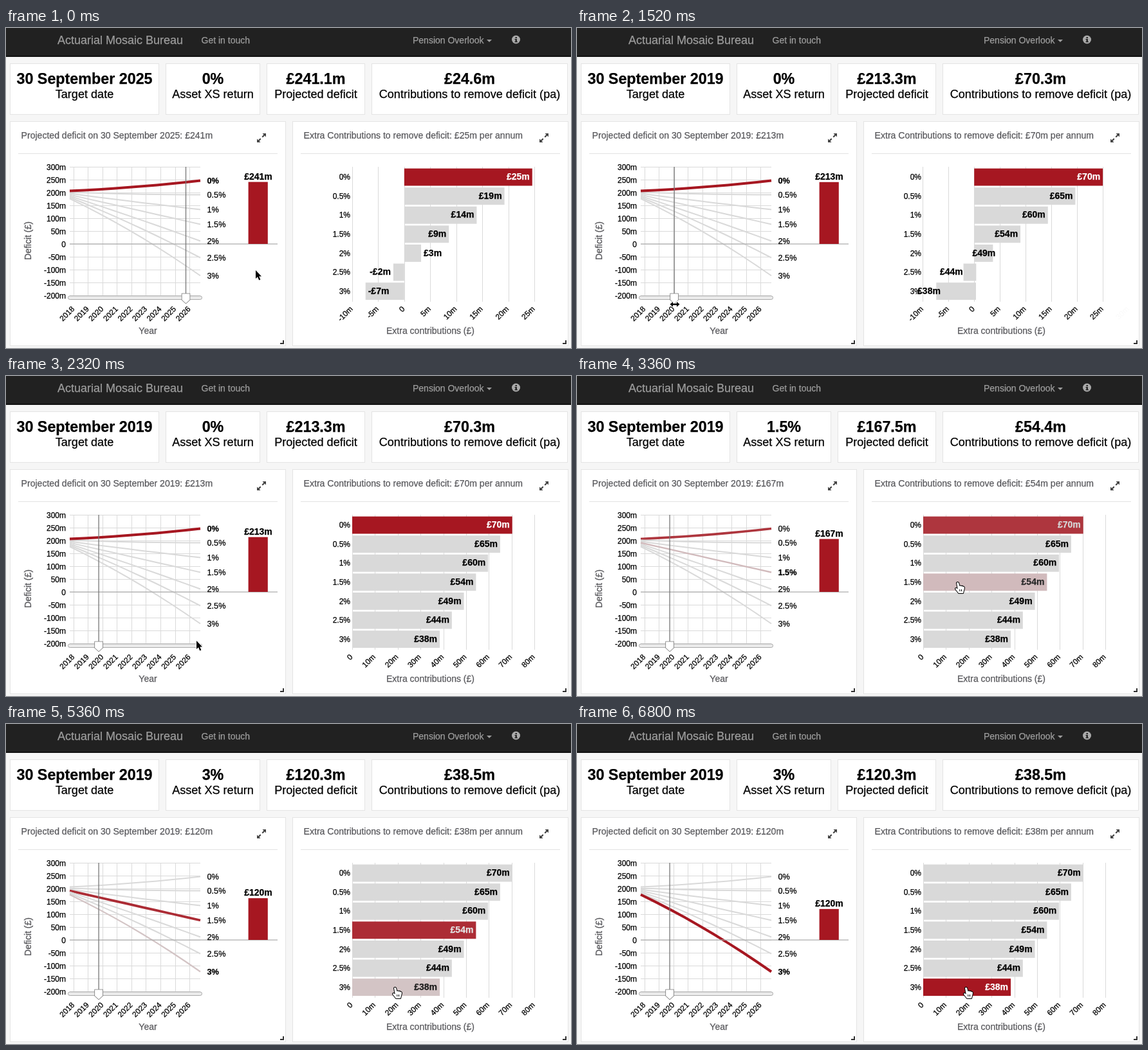
An HTML page with a canvas that plays this animation: 878x498 px, repeating every 6840 ms.

```html
<!DOCTYPE html>
<html lang="en">
<head>
<meta charset="utf-8">
<title>Deficit dashboard</title>
<style>
html, body { margin: 0; width: 100%; height: 100%; overflow: hidden; background: #f6f6f6; }
canvas { display: block; }
</style>
</head>
<body>
<canvas id="stage" width="878" height="498"></canvas>
<script>
const c = document.getElementById('stage').getContext('2d');
const LOOP = 6840, DURATION = 600;
const RED = [166, 23, 33], GREY = [217, 217, 217], WHITE = [255, 255, 255], BLACK = [0, 0, 0];

// Each stage starts at a click or a release of the slider.
const stages = [
  { start: -DURATION, year: 2025, pick: 0, deficit: 241.1, top: 24.6, step: 5.34, min: -10, max: 25, tick: 5 },
  { start: 1418, year: 2019, pick: 0, deficit: 213.3, top: 70.3, step: 5.306, min: 0, max: 80, tick: 10 },
  { start: 3156, year: 2019, pick: 3, deficit: 167.47, top: 70.3, step: 5.306, min: 0, max: 80, tick: 10 },
  { start: 5180, year: 2019, pick: 6, deficit: 120.3, top: 70.3, step: 5.306, min: 0, max: 80, tick: 10 }
];
const lineEnds = [237, 259, 282, 305, 331, 357, 385];
const lineBends = [-7, -4, -2, 0, 4, 12, 22];
const cursorPath = [
  [0, 388, 377], [620, 280, 424], [750, 280, 425], [1400, 152, 430], [1600, 152, 430],
  [2320, 296, 412], [3080, 592, 321], [3420, 592, 321], [3960, 597, 356],
  [4300, 598, 360], [5080, 605, 410], [LOOP, 605, 410]
];

const mix = (a, b, p) => a + (b - a) * p;
const blend = (a, b, p) => `rgb(${a.map((v, i) => Math.round(mix(v, b[i], p)))})`;
const clamp = p => Math.max(0, Math.min(1, p));
const cubic = p => p < .5 ? 4 * p ** 3 : 1 - 4 * (1 - p) ** 3;
const smooth = p => p * p * (3 - 2 * p);
const percent = i => i / 2 + '%';
const money = v => (v < 0 ? '-' : '') + '£' + Math.abs(Math.round(v)) + 'm';
const yearX = y => 99 + (y - 2017.75) * 203 / 9;
const rowY = i => 218.6 + 29.6 * i;
const valueAt = (s, i) => s.top - s.step * i;
const scaleX = (s, v) => 538 + (v - s.min) * 283 / (s.max - s.min);

// A hairline stroke gives the type its slightly heavier weight.
function text(str, x, y, size, color = '#000', align = 'left', bold = false) {
  c.font = `${bold ? 'bold ' : ''}${size}px "Liberation Sans", Arial, sans-serif`;
  c.fillStyle = c.strokeStyle = color;
  c.textAlign = align;
  c.lineWidth = .25;
  c.fillText(str, x, y);
  c.strokeText(str, x, y);
}

function turned(str, x, y, angle, size, color, align) {
  c.save();
  c.translate(x, y);
  c.rotate(angle);
  text(str, 0, 0, size, color, align);
  c.restore();
}

function rect(x, y, w, h, color) {
  c.fillStyle = color;
  c.fillRect(x, y, w, h);
}

function line(points, color, width = 1) {
  c.beginPath();
  points.forEach(([x, y]) => c.lineTo(x, y));
  c.strokeStyle = color;
  c.lineWidth = width;
  c.stroke();
}

function shape(d, x, y, fill, stroke, width = 1) {
  c.save();
  c.translate(x, y);
  const p = new Path2D(d);
  c.lineWidth = width;
  c.lineJoin = 'round';
  c.strokeStyle = stroke;
  c.fillStyle = fill;
  c.stroke(p);
  c.fill(p);
  c.restore();
}

function box(x, y, w, h) {
  rect(x, y, w, h, '#e4e4e4');
  rect(x + 1, y + 1, w - 2, h - 2, '#fff');
}

function header() {
  rect(0, 0, 878, 44, '#212121');
  rect(0, 43, 878, 2, '#101010');
  text('Actuarial Mosaic Bureau', 80, 25, 18, '#9d9d9d');
  text('Get in touch', 303.5, 24, 14, '#9d9d9d');
  text('Pension Overlook', 632, 24, 14, '#9d9d9d');
  shape('M0 0H8L4 4Z', 747, 18, '#9d9d9d', 'transparent');
  c.beginPath();
  c.arc(792.5, 18, 6.5, 0, 7);
  c.fillStyle = '#aaa';
  c.fill();
  rect(791.5, 14, 2.4, 2, '#212121');
  rect(791.5, 17, 2.4, 5, '#212121');
  rect(790.5, 17, 2, 1.2, '#212121');
  rect(790.5, 21, 4.4, 1.2, '#212121');
}

function card(x, w, big, small) {
  box(x, 55, w, 80);
  text(big, x + w / 2, 87, 23.3, '#000', 'center', true);
  text(small, x + w / 2, 109, 18.1, '#000', 'center');
}

function panel(x, title) {
  box(x, 145, 429, 350);
  text(title, x + 17.6, 172, 14.05, '#58585c');
  rect(x + 13, 195, 403, 1, '#e2e2e2');
  const arrow = 'M7 -7V-1.5L5 -3.5 2 -.5 .5 -2 3.5 -5 1.5 -7Z';
  for (const turn of [0, Math.PI]) {
    c.save();
    c.translate(x + 391, 171);
    c.rotate(turn);
    shape(arrow, 0, 0, '#444', 'transparent');
    c.restore();
  }
  line([[x + 420, 491], [x + 425, 491], [x + 425, 486]], '#333', 2);
}

function lineChart(now, old, e, handle) {
  for (let v = -200; v <= 300; v += 50) {
    const y = 336 - v * .4;
    rect(99, y, 203, 1, '#dadada');
    text(v ? v + 'm' : '0', 93, y + 5, 12, '#000', 'right');
  }
  for (let y = 2018; y <= 2026; y++) {
    const x = yearX(y);
    rect(Math.round(x), 216, 1, 200, '#dadada');
    turned(y, x + 2.5, 438, -Math.PI / 4, 12, '#000', 'right');
  }
  const order = [0, 1, 2, 3, 4, 5, 6].sort((a, b) => (a === now.pick) - (b === now.pick));
  for (const i of order) {
    const on = mix(old.pick === i, now.pick === i, e);
    const first = 253 + 2 * i, bend = lineBends[i], points = [];
    for (let k = 0; k <= 9; k++) {
      const u = k / 9;
      points.push([99 + 203 * u, first + .5 + (lineEnds[i] - first - bend) * u + bend * u * u]);
    }
    line(points, blend(GREY, RED, on), 2 + 2 * on);
  }
  rect(99, 335.5, 323, 1.2, '#aaa');
  lineEnds.forEach((y, i) => text(percent(i), 312.5, y + 4.5, 12.7, '#000', 'left', i === now.pick));

  const top = 336 - mix(old.deficit, now.deficit, e) * .4;
  rect(376.6, top, 30.2, 336 - top, blend(RED, RED, 0));
  text('£' + Math.floor(now.deficit) + 'm', 392, top - 4, 14, '#000', 'center', true);
  text('Year', 220.5, 476, 14, '#58585c', 'center');
  turned('Deficit (£)', 39, 331, -Math.PI / 2, 14, '#58585c', 'center');

  c.beginPath();
  c.roundRect(96.5, 417, 208, 5.5, 2.7);
  c.fillStyle = '#ececec';
  c.fill();
  c.strokeStyle = '#aaa';
  c.lineWidth = 1;
  c.stroke();
  line([[handle, 216], [handle, 413]], '#777', 1.3);
  shape('M-6 -7H6V2.5L0 8 -6 2.5Z', handle, 420.5, '#fff', '#777', 1.6);
}

function ticks(s, from, to, e, alpha) {
  c.globalAlpha = alpha;
  for (let v = s.min; v <= s.max; v += s.tick) {
    const x = mix(scaleX(from, v), scaleX(to, v), e);
    rect(Math.round(x), 216, 1, 210, '#dadada');
    turned(v ? v + 'm' : '0', x + 1.5, 438, -Math.PI / 4, 12, '#000', 'right');
  }
  c.globalAlpha = 1;
}

// Labels sit inside the bar's tip, or just outside when the bar is short.
function label(s, i) {
  const v = valueAt(s, i), x = scaleX(s, v), short = Math.abs(x - scaleX(s, 0)) < 40;
  const left = (v < 0) !== short;
  return { x: x + (left ? 4 : -4), align: left ? 'left' : 'right' };
}

function barChart(now, old, e) {
  c.save();
  c.beginPath();
  c.rect(446, 197, 427, 290);
  c.clip();
  if (now.max !== old.max && e < 1) ticks(old, old, now, e, 1 - e);
  ticks(now, old, now, e, now.max === old.max ? 1 : e);
  for (let i = 0; i < 7; i++) {
    const on = mix(old.pick === i, now.pick === i, e);
    const edges = s => [scaleX(s, 0), scaleX(s, valueAt(s, i))].sort((a, b) => a - b);
    const a = edges(old), b = edges(now);
    const left = mix(a[0], b[0], e), right = mix(a[1], b[1], e);
    rect(left, rowY(i), right - left, 26.9, blend(GREY, RED, on));
  }
  for (let i = 0; i < 7; i++) {
    const on = mix(old.pick === i, now.pick === i, e);
    const y = rowY(i) + 17.5, place = label(now, i);
    text(percent(i), 535, y, 12, '#000', 'right');
    text(money(valueAt(now, i)), mix(label(old, i).x, place.x, e), y, 14,
      blend(BLACK, WHITE, on), place.align, true);
  }
  c.restore();
  text('Extra contributions (£)', 659.5, 476, 14, '#58585c', 'center');
}

function cursorAt(t) {
  const k = Math.max(1, cursorPath.findIndex(p => p[0] > t));
  const [t0, x0, y0] = cursorPath[k - 1], [t1, x1, y1] = cursorPath[k];
  const p = smooth((t - t0) / (t1 - t0));
  return [mix(x0, x1, p), mix(y0, y1, p)];
}

function cursor(t, x, y) {
  if (t > 620 && t < 1640) {
    shape('M-7.5 0L-3 -4V-1.2H3V-4L7.5 0 3 4V1.2H-3V4Z', x, y, '#000', '#fff', 2);
  } else if (x < 538) {
    shape('M0 0V13L3 10.3 5.2 15.5 7.4 14.5 5.2 9.5H9Z', x, y, '#000', '#fff', 2);
  } else {
    shape('M-1.5 1Q0 -.8 1.6 1L3 6Q4.5 4.8 5.8 6.2 7.2 5.3 8.4 6.9 10.4 6.5 10.5 8.8L9.6 13 8.5 17H1.5L-3.2 11Q-4 8.8 -2 9L.2 10.5Z',
      x - .5, y, '#fff', '#000', 2);
    line([[x + 2.7, y + 11], [x + 3, y + 14]], '#000');
    line([[x + 5.5, y + 11], [x + 5.5, y + 14]], '#000');
  }
}

function draw(t) {
  const k = stages.findLastIndex(s => s.start <= t);
  const now = stages[k], old = stages[Math.max(0, k - 1)];
  const e = cubic(clamp((t - now.start) / DURATION));
  const [x, y] = cursorAt(t);
  const handle = t < 750 ? 279.5 : k === 0 ? Math.min(279.5, x - .5)
    : k === 1 ? mix(151.3, yearX(2019.75), e) : yearX(2019.75);
  const extra = valueAt(now, now.pick), date = '30 September ' + now.year;

  rect(0, 0, 878, 498, '#f6f6f6');
  header();
  card(6, 232, date, 'Target date');
  card(248, 147, percent(now.pick), 'Asset XS return');
  card(405, 153, `£${now.deficit.toFixed(1)}m`, 'Projected deficit');
  card(568, 305, `£${extra.toFixed(1)}m`, 'Contributions to remove deficit (pa)');
  panel(6, `Projected deficit on ${date}: £${Math.floor(now.deficit)}m`);
  panel(445, `Extra Contributions to remove deficit: ${money(extra)} per annum`);
  lineChart(now, old, e, handle);
  barChart(now, old, e);
  cursor(t, x, y);
}

const begin = performance.now();
function frame() {
  draw((performance.now() - begin) % LOOP);
  requestAnimationFrame(frame);
}
frame();
</script>
</body>
</html>
```
